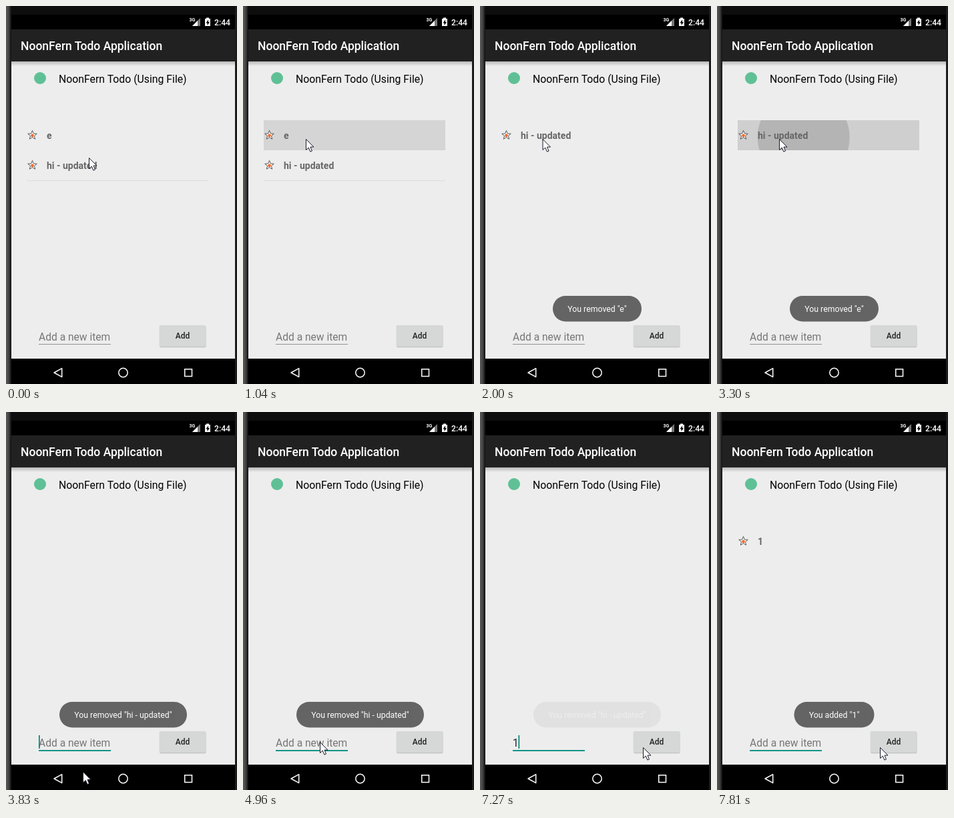
These frames come from a looping animation (346 by 566 pixels, 8000 ms). An HTML page:

```html
<!DOCTYPE html>
<html lang="en">
<head>
<meta charset="utf-8">
<style>
html, body { margin: 0; width: 100%; height: 100%; overflow: hidden; background: #0d0d0d; }
svg { display: block; width: 100vw; height: 100vh; }
text { font-family: Roboto, sans-serif; }
.row text { font-size: 14px; font-weight: 700; fill: #666; }
.toast text { font-size: 12.3px; fill: #fff; text-anchor: middle; }
</style>
</head>
<body>
<svg viewBox="0 0 346 566">
  <defs>
    <linearGradient id="edge"><stop stop-color="#5a5a5a"/><stop offset=".5" stop-color="#444"/><stop offset="1" stop-color="#0d0d0d"/></linearGradient>
    <linearGradient id="shade" x2="0" y2="1"><stop stop-color="#b8b8b8"/><stop offset="1" stop-color="#ededed"/></linearGradient>
    <clipPath id="rowClip"><path d="M31 171h272v45H31z"/></clipPath>
    <g id="star">
      <path id="starShape" fill="#fff" stroke="#444" stroke-width=".9" stroke-linejoin="round"/>
      <circle cy=".4" r="2.3" fill="#f4692a"/>
    </g>
  </defs>

  <rect width="346" height="566" fill="#0d0d0d"/>
  <rect width="8" height="566" fill="url(#edge)"/>
  <rect x="343" width="3" height="566" fill="#1c1c1c"/>
  <rect x="8" y="13" width="335" height="553"/>
  <rect x="8" y="35" width="335" height="48" fill="#212121"/>
  <rect x="8" y="83" width="335" height="445" fill="#ededed"/>
  <rect x="8" y="83" width="335" height="7" fill="url(#shade)"/>
  <rect x="8" y="525" width="335" height="3" fill="#f1f1f1"/>

  <g fill="#fff">
    <text x="274.5" y="23" font-size="7" font-weight="700">3G</text>
    <path d="M291 18v12h-12z" fill="#777"/>
    <path d="M287 22v8h-8z"/>
    <path d="M300 17.5h4V19h2v11h-8V19h2z"/>
    <path d="M303 20.5l-3.500 5h2v3.500l3.500-5h-2z" fill="#000"/>
    <text x="312" y="29" font-size="12.2" font-weight="500">2:44</text>
    <text x="22" y="66" font-size="17.5" font-weight="500">NoonFern Todo Application</text>
  </g>
  <circle cx="51" cy="108" r="9" fill="#5fc096"/>
  <text x="79" y="115" font-size="15.8">NoonFern Todo (Using File)</text>

  <g fill="none" stroke="#fff" stroke-width="1.5">
    <path d="M72 549 83.700 542.600v12.800z" stroke-linejoin="round"/>
    <circle cx="175.500" cy="549" r="6.700"/>
    <rect x="267.750" y="543.750" width="10.750" height="10.750"/>
  </g>

  <g id="press" clip-path="url(#rowClip)">
    <rect id="glow" x="31" y="171" width="272" height="45"/>
    <circle id="ripple" fill-opacity=".13"/>
  </g>
  <g class="row" id="row0"><use href="#star" x="39.500" y="193.500"/><text id="label" x="61" y="199"></text></g>
  <g class="row" id="row1"><use href="#star" x="39.500" y="238.500"/><text x="61" y="244">hi - updated</text>
    <path d="M31 261.500h272" stroke="#dcdcdc"/></g>

  <text id="field" x="49" y="500.500" font-size="15.600"></text>
  <rect id="line" x="49" y="506" width="108"/>
  <rect id="caret" y="484" width="1.700" height="20" fill="#00897b"/>
  <rect x="230" y="479" width="69.500" height="32.300" rx="2" fill="#c0c1c1"/>
  <rect id="button" x="229.500" y="478" width="70" height="32" rx="2"/>
  <text x="264.500" y="498" font-size="12" font-weight="500" fill="#222" text-anchor="middle">Add</text>

  <g id="toasts"></g>
  <path id="cursor" d="M0 0V16L3.800 12.600 6.400 18.600 9 17.500 6.500 11.600H11.500z" fill="#fff" stroke="#1a1a2a"/>
</svg>
<script>
const TICK = 130; // the screen refreshes in steps; all moments below count them
const FOCUS = 26, TAP = 34, TYPE = 48, CLICK = 57, ADDED = 58;
const HOLDS = [[8, 12], [23, 26]]; // long presses that remove a row

const $ = id => document.getElementById(id);
const set = (id, attrs) => { for (const k in attrs) $(id).setAttribute(k, attrs[k]); };
const show = (id, on) => set(id, { visibility: on ? 'visible' : 'hidden' });
const clamp = v => Math.min(1, Math.max(0, v));
const smooth = p => p * p * (3 - 2 * p);

const starPoints = Array.from({ length: 10 }, (_, i) => {
  const r = i % 2 ? 3.1 : 7.1, a = (i / 5 - .5) * Math.PI;
  return [r * Math.cos(a), r * Math.sin(a)];
});
set('starShape', { d: `M${starPoints.join('L')}z` });

const toasts = [
  { text: 'You removed "e"', width: 133, from: 12, to: 25 },
  { text: 'You removed "hi - updated"', width: 191, from: 26, to: 42 },
  { text: 'You added "1"', width: 120, from: 57, to: 99 }
];
$('toasts').innerHTML = toasts.map(({ text, width }) => `<g class="toast">
  <rect x="${175.5 - width / 2}" y="434" width="${width}" height="38.5" rx="19.2" fill="#626262"/>
  <text x="175.5" y="458">${text}</text></g>`).join('');

// Pointer stops: tick, x, y
const stops = [[1, 124, 227], [5, 94, 199], [26, 93, 199], [28.5, 115, 540],
  [33, 115, 494], [51, 115, 494], [53, 211, 503], [56, 244, 502]];

function pointer(n) {
  const i = stops.findLastIndex(s => s[0] <= n);
  const [t0, x0, y0] = stops[Math.max(i, 0)];
  const [t1, x1, y1] = stops[Math.min(i + 1, stops.length - 1)];
  const p = t1 > t0 ? smooth((n - t0) / (t1 - t0)) : 0;
  return [x0 + (x1 - x0) * p, y0 + (y1 - y0) * p];
}

// A faded toast leaves a faint ghost until the next one shows.
function toastOpacity(n, i) {
  const { from, to } = toasts[i], next = toasts[i + 1];
  if (next && n >= next.from + 2) return 0;
  return Math.min(clamp((n - from) / 3), Math.max(.08, clamp(1 - (n - to) / 3))) * .98;
}

function drawPress(n) {
  const hold = HOLDS.find(([a, b]) => n >= a && n < b);
  show('press', hold);
  if (!hold) return;
  const p = (n - hold[1] + (hold === HOLDS[0] ? 4 : 4)) * .163;
  set('glow', { fill: p > .4 ? '#cfcfcf' : '#d5d5d5' });
  set('ripple', { cx: 94 + 73 * p, cy: 199 - 5 * p, r: 141 * p });
}

function drawField(n) {
  const typed = n >= TYPE && n < ADDED, focus = n >= FOCUS;
  $('field').textContent = typed ? '1' : 'Add a new item';
  set('field', { fill: typed ? '#222' : '#777' });
  set('line', { height: focus ? 2 : 1, fill: focus ? '#0f9488' : '#929292' });
  const since = n - [TYPE, TAP, FOCUS].find(t => t <= n);
  show('caret', focus && since / 3.6 % 2 < 1);
  set('caret', { x: typed ? 57.5 : 49 });
}

function draw(n) {
  const [firstGone, secondGone] = HOLDS.map(h => h[1]);
  drawPress(n);
  drawField(n);
  show('row0', n < secondGone || n >= ADDED);
  show('row1', n < firstGone);
  $('label').textContent = n < firstGone ? 'e' : n < secondGone ? 'hi - updated' : '1';
  set('button', { fill: n === CLICK ? '#c4c6c6' : '#d6d8d7' });
  toasts.forEach((_, i) => $('toasts').children[i].setAttribute('opacity', toastOpacity(n, i)));
  const [x, y] = pointer(n);
  set('cursor', { transform: `translate(${x + .5} ${y + .5})` });
}

const start = performance.now();
function frame() {
  const now = (performance.now() - start) % 8000;
  draw(Math.floor((now + 20) / TICK));
  requestAnimationFrame(frame);
}
frame();
</script>
</body>
</html>
```
